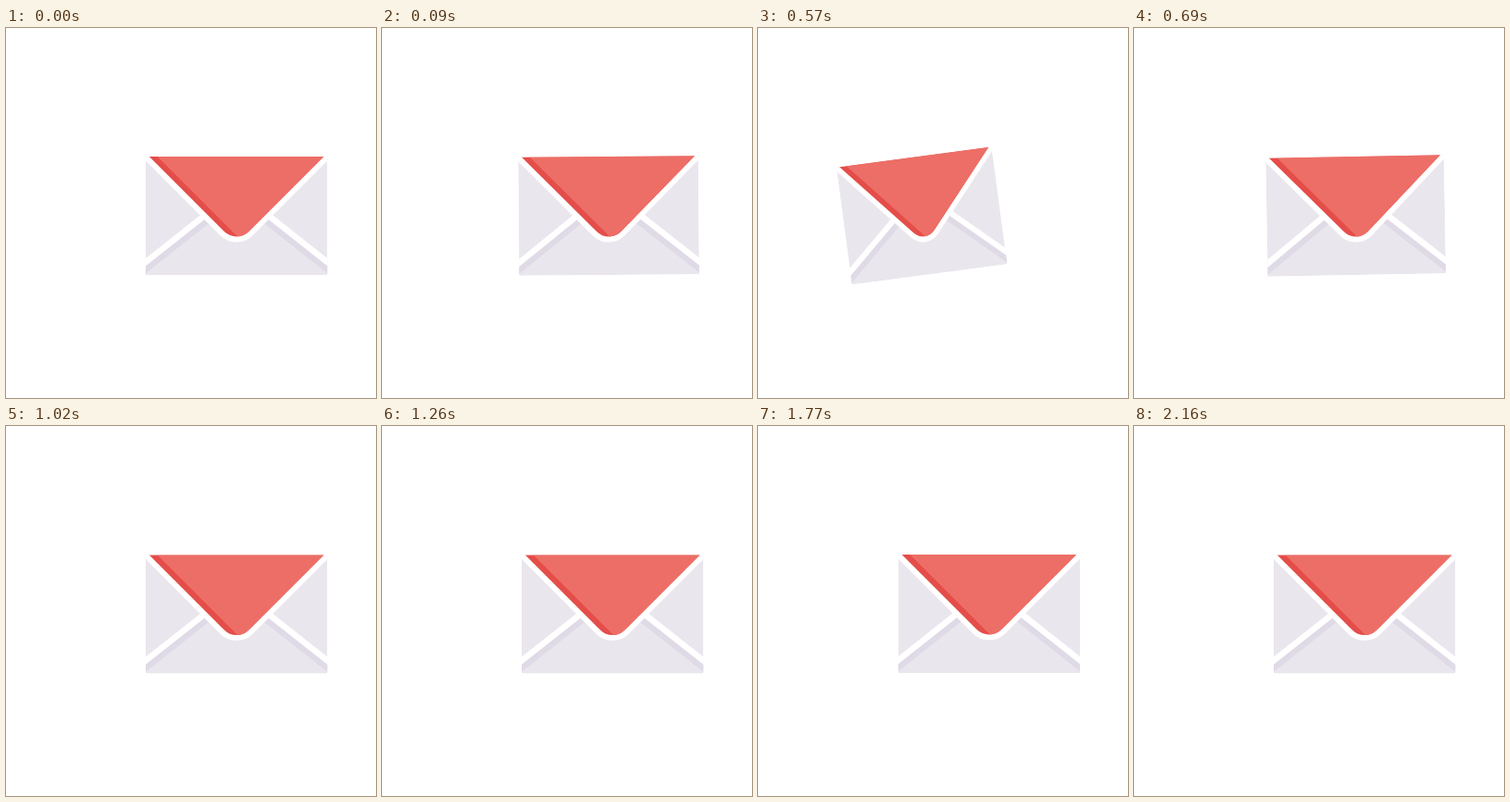
Recreate the animation shown at these times as an HTML page. Size 400 by 400 pixels, loop 4.19 s.

```html
<!DOCTYPE html>
<html lang="en">
<head>
<meta charset="utf-8">
<title>Envelope</title>
<style>
  html, body { margin: 0; width: 100%; height: 100%; overflow: hidden; background: #fff; }
  svg { display: block; width: 100%; height: 100%; }
</style>
</head>
<body>
<svg viewBox="0 0 400 400">
  <clipPath id="paper"><rect x="-98.2" y="-64" width="196.4" height="128"/></clipPath>
  <g id="envelope">
    <g clip-path="url(#paper)" fill="none" stroke-width="6.5">
      <rect x="-98.2" y="-64" width="196.4" height="128" fill="#eae6ed"/>
      <path d="M-108,65.8 L0,-19.5 L108,65.8" stroke="#dfdae6"/>
      <path d="M-108,57.8 L0,-27.5 L108,57.8" stroke="#fff"/>
      <path d="M-98.2,-68 L-13.3,17 A18.8 18.8 0 0 0 13.3,17 L98.2,-68Z"
            fill="#e44d49" stroke="#fff" stroke-width="12"/>
      <path d="M-94.3,-64 L-13.3,17 A18.8 18.8 0 0 0 13.3,17 L94.3,-64Z" fill="#e44d49"/>
      <path d="M-85.5,-64 L1,22.5 A18.8 18.8 0 0 0 13.3,17 L94.3,-64Z" fill="#ed6e66"/>
    </g>
  </g>
</svg>
<script>
  const LOOP = 4190, STEP = 30, LAST_STEP = 72;
  const envelope = document.getElementById('envelope');

  function ease(time, start, duration) {
    const s = Math.min(1, Math.max(0, (time - start) / duration));
    return s < 0.5 ? 4 * s ** 3 : 1 - 4 * (1 - s) ** 3;
  }

  function draw(now) {
    const step = Math.min(LAST_STEP, Math.floor((now % LOOP) / STEP));
    const time = step * STEP;
    const pull = ease(time, 0, 390) - ease(time, 418, 387);
    // A slight tremble, alternating between the axes.
    const dx = step % 2 ? 0.6 : 0;
    const dy = step && step % 2 === 0 ? 0.6 : 0;
    envelope.setAttribute('transform',
      `translate(${249.2 - 96 * pull + dx} ${203 + dy}) rotate(${-10 * pull}) scale(${1 - 0.182 * pull} 1)`);
  }

  const origin = performance.now();
  function tick() {
    draw(performance.now() - origin);
    requestAnimationFrame(tick);
  }
  tick();
</script>
</body>
</html>
```
